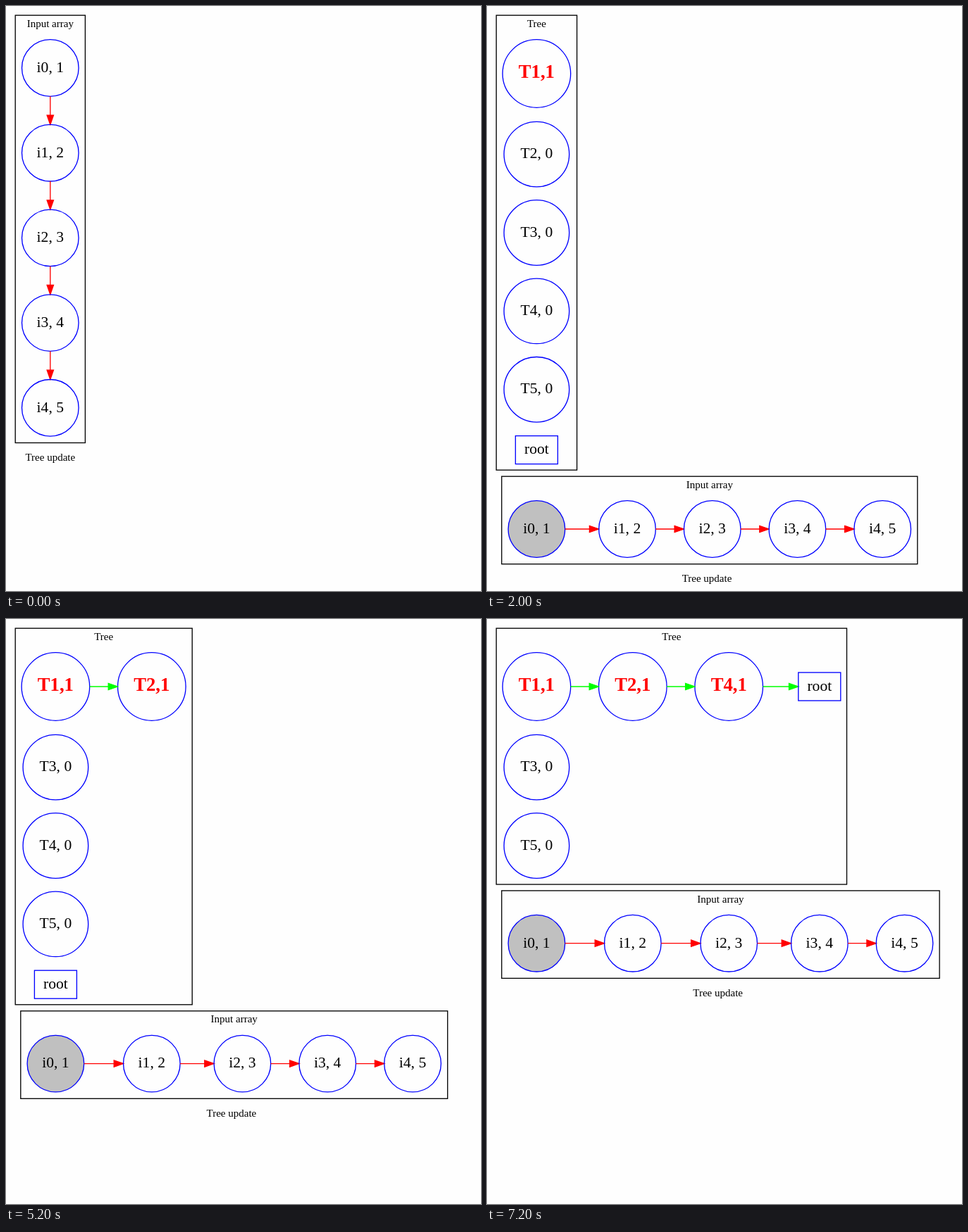
Write an HTML page that moves like this. It is 674 px wide and 831 px high and loops after 8000 ms.

```html
<!DOCTYPE html>
<html lang="en">
<head>
<meta charset="utf-8">
<title>Tree update</title>
<style>
  html, body { margin: 0; width: 100%; height: 100%; overflow: hidden; background: #fefefe; }
  svg { display: block; width: 674px; height: 831px; }
  g { visibility: hidden; animation: 8s step-end infinite; }
  .short { animation-name: short; }
  .long { animation-name: long; }
  @keyframes short { 0% { visibility: visible; } 12.5%, 100% { visibility: hidden; } }
  @keyframes long { 0% { visibility: visible; } 25%, 100% { visibility: hidden; } }
  rect, circle { fill: none; stroke: #00f; stroke-width: 1.33; }
  .cluster { stroke: #000; }
  .visited { fill: #c0c0c0; }
  path { stroke-width: 1.33; }
  .red { stroke: #f00; fill: #f00; }
  .green { stroke: #0f0; fill: #0f0; }
  text { font: 21.6px "Liberation Serif", serif; text-anchor: middle; }
  .label { font-size: 15px; }
  .hot { font-size: 26.67px; font-weight: bold; fill: #f00; }
</style>
</head>
<body>
<svg id="stage" viewBox="0 0 674 831"></svg>
<script>
const INPUT_R = 40.3, IDLE_R = 46.3, HOT_R = 48.3, ROW = 111.4;

const text = (x, y, s, cls = '') => `<text class="${cls}" x="${x}" y="${y}">${s}</text>`;
const circle = (x, y, r, cls = '') => `<circle class="${cls}" cx="${x}" cy="${y}" r="${r}"/>`;
const box = (x, y, right, bottom, cls = '') =>
  `<rect class="${cls}" x="${x}" y="${y}" width="${right - x}" height="${bottom - y}"/>`;

const cluster = (x, y, right, bottom, title) =>
  box(x, y, right, bottom, 'cluster') + text((x + right) / 2, y + 16.6, title, 'label');

// Arrow along one axis; the tip touches the next node.
function arrow(x, y, length, color, down = false) {
  const neck = length - 13.3;
  return `<path class="${color}" transform="translate(${x} ${y}) rotate(${down ? 90 : 0})"
    d="M0 0H${neck}V-4.67L${length} 0L${neck} 4.67V0"/>`;
}

const idle = (x, y, n) => circle(x, y, IDLE_R) + text(x, y + 5.6, `T${n}, 0`);
const hot = (x, n) => circle(x, 96, HOT_R) + text(x, 102, `T${n},1`, 'hot');
const root = (x, y) => box(x - 30, y - 20, x + 30, y + 20) + text(x, y + 5.8, 'root');
const idleColumn = (x, y, ids) => ids.map((n, i) => idle(x, y + i * ROW, n)).join('');

function inputArray(points, visited = false) {
  const [x0, y0] = points[0], [x1, y1] = points[points.length - 1];
  const bottom = y1 + 49.7, right = x1 + 49.6;
  let out = cluster(x0 - 49.6, y0 - 74.8, right, bottom, 'Input array');
  points.forEach(([x, y], i) => {
    out += circle(x, y, INPUT_R, visited && i === 0 ? 'visited' : '') +
      text(x, y + 5.8, `i${i}, ${i + 1}`);
    const next = points[i + 1];
    if (!next) return;
    const down = next[0] === x;
    const gap = next[0] - x + next[1] - y - 2 * INPUT_R;
    out += arrow(x + (down ? 0 : INPUT_R), y + (down ? INPUT_R : 0), gap, 'red', down);
  });
  return out + text((13.2 + right) / 2, bottom + 25.6, 'Tree update', 'label');
}

const inputRow = (y, xs, visited) => inputArray(xs.map(x => [x, y]), visited);
const tree = (right, bottom) => cluster(13.2, 13.2, right, bottom, 'Tree');

const scenes = [
  [0, 'short', inputArray([0, 1, 2, 3, 4].map(i => [62.8, 88 + i * 120.7]))],
  [1, 'short', tree(123, 653.8) + idleColumn(68, 93.6, [1, 2, 3, 4, 5]) + root(68, 625) +
    inputRow(737.5, [68, 194.3, 315, 435.8, 556.6])],
  [2, 'long', tree(127.6, 659.2) + hot(70.4, 1) + idleColumn(70.4, 210.6, [2, 3, 4, 5]) +
    root(70.4, 630.6) + inputRow(743, [70.4, 199, 319.7, 440.4, 561.2], true)],
  [4, 'long', tree(264.2, 547.8) + hot(70.4, 1) + hot(206.8, 2) +
    arrow(118.7, 96, 39.8, 'green') + idleColumn(70.4, 210.6, [3, 4, 5]) +
    root(70.4, 519.2) + inputRow(631.6, [70.4, 206.8, 335.4, 456.2, 577], true)],
  [6, 'long', tree(510.5, 377) + hot(70.4, 1) + hot(206.8, 2) + hot(343.2, 4) +
    arrow(118.7, 96, 39.8, 'green') + arrow(255.1, 96, 39.8, 'green') +
    arrow(391.5, 96, 50.3, 'green') + root(471.8, 96) + idleColumn(70.4, 210.6, [3, 5]) +
    inputRow(460.7, [70.4, 206.8, 343.2, 471.8, 592.5], true)]
];

document.getElementById('stage').innerHTML = scenes.map(([start, length, content]) =>
  `<g class="${length}" style="animation-delay:${start}s">${content}</g>`).join('');
</script>
</body>
</html>
```
